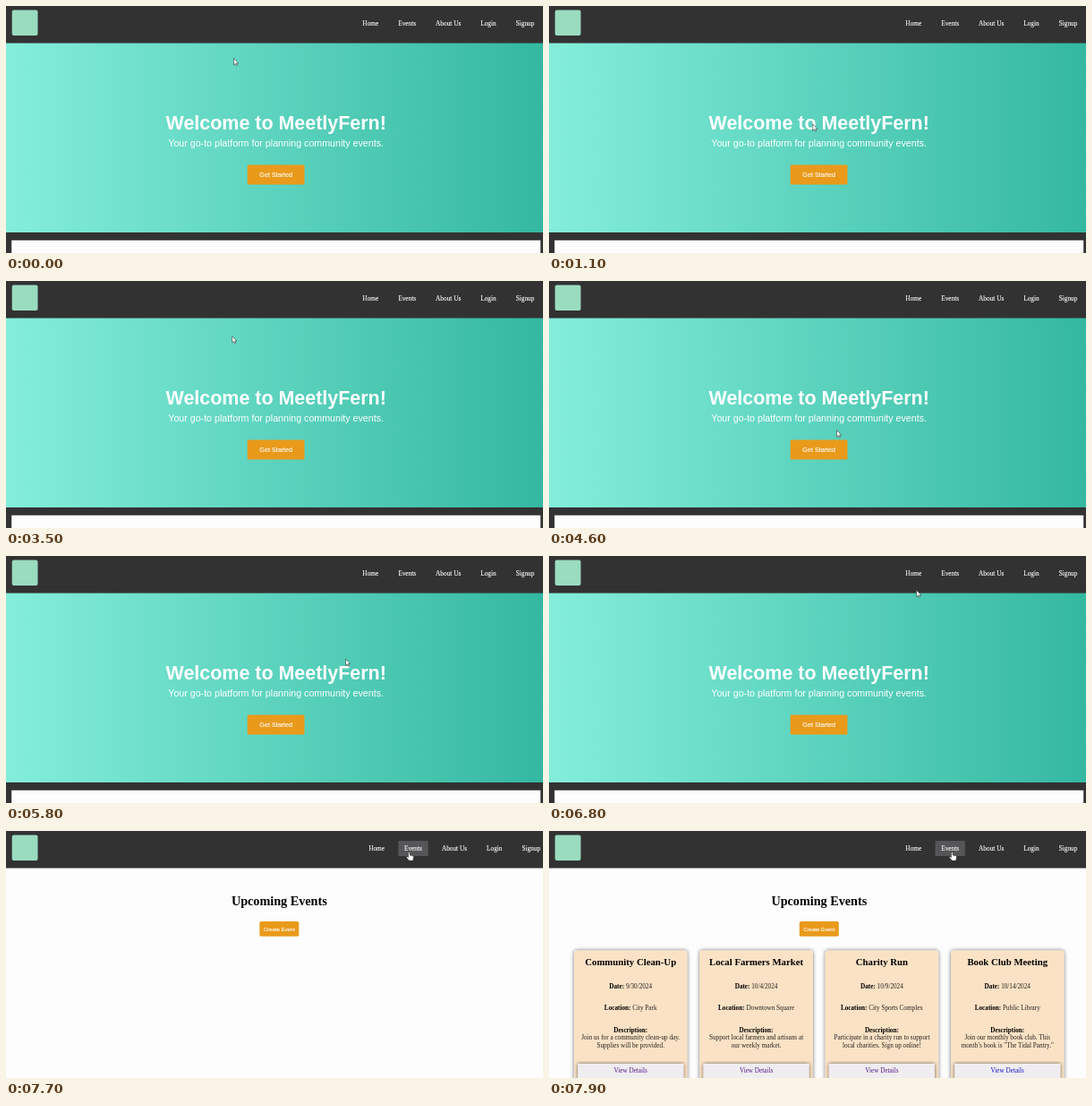
Animation of 600x276 px, one loop 8 s. Source, as an HTML page:

```html
<!DOCTYPE html>
<html lang="en">
<head>
<meta charset="utf-8">
<title>Community events</title>
<style>
  html, body { margin: 0; width: 100%; height: 100%; overflow: hidden; background: #333; }
  svg { display: block; width: 600px; height: 276px; }
  .serif { font-family: "Liberation Serif", "Times New Roman", serif; }
  .sans { font-family: "Liberation Sans", Arial, sans-serif; }
  .mid { text-anchor: middle; }
  .bold { font-weight: bold; }
  .crisp { stroke: #fff; stroke-width: .12px; }
</style>
</head>
<body>
<svg viewBox="0 0 600 276" xmlns="http://www.w3.org/2000/svg">
  <defs>
    <linearGradient id="mint">
      <stop offset="0" stop-color="#84eedb"/>
      <stop offset="1" stop-color="#34b8a1"/>
    </linearGradient>
    <filter id="shadow" x="-10%" y="-10%" width="120%" height="120%">
      <feDropShadow dx="0" dy="0" stdDeviation="2.1" flood-color="#000" flood-opacity=".6"/>
    </filter>
  </defs>

  <g id="home">
    <rect width="600" height="276" fill="#333233"/>
    <rect y="41" width="600" height="212" fill="url(#mint)"/>
    <rect x="6.2" y="261.8" width="591" height="15" fill="#fdfdfd"/>
    <g class="sans mid" fill="#fff">
      <text class="bold" x="301.7" y="138" font-size="21.45">Welcome to MeetlyFern!</text>
      <text x="301.6" y="157" font-size="10.67">Your go-to platform for planning community events.</text>
      <rect x="269.7" y="177.5" width="63.8" height="22" rx="1" fill="#e99a1b"/>
      <text class="crisp" x="301.7" y="190.6" font-size="7.2">Get Started</text>
    </g>
  </g>

  <g id="events">
    <rect width="600" height="276" fill="#fdfdfe"/>
    <g id="eventsHead" class="mid">
      <text class="serif bold" x="301.8" y="83" font-size="14.2">Upcoming Events</text>
      <rect x="279.8" y="101" width="44" height="16.7" rx="1.8" fill="#e99a1b"/>
      <text class="sans crisp" x="301.8" y="111.6" font-size="6" fill="#fff">Create Event</text>
    </g>
    <g id="cards" class="serif mid" font-size="7.2" fill="#222"></g>
  </g>

  <g class="serif" font-size="7.3" fill="#fff">
    <rect width="600" height="41.5" fill="#333233"/>
    <rect x="6.7" y="4.4" width="28.8" height="28.6" rx="2" fill="#9adcc0"/>
    <g id="nav"><rect id="hover" y="11" height="17" fill="#565557"/></g>
  </g>

  <path id="arrow" d="M0 0V7.4L1.7 5.9L2.9 8.4L4 7.9L2.9 5.5H5.2Z" fill="#fff" stroke="#333" stroke-width=".6"/>
  <path id="hand" d="M0 .8Q.8-.5 1.6.8V3.6L5 4.3Q6 4.6 5.9 5.6L5.2 9.6H.9L-2 6.2Q-2.2 4.9-1 5.2L0 6Z" fill="#fff" stroke="#333" stroke-width=".5"/>
</svg>

<script>
const LOOP = 8000, STEP = 100, PAGE_AT = 7700, CARDS_AT = 7800;
const $ = id => document.getElementById(id);

function add(parent, tag, attrs, text = "") {
  const el = document.createElementNS("http://www.w3.org/2000/svg", tag);
  for (const key in attrs) el.setAttribute(key, attrs[key]);
  el.textContent = text;
  parent.append(el);
  return el;
}

// Links are laid out from the right edge with equal gaps.
const GAP = 22, PAD = 6.7, hover = { left: 0, right: 0 };
let edge = 590.4;
for (const label of ["Signup", "Login", "About Us", "Events", "Home"]) {
  const link = add($("nav"), "text", { y: 22, class: "crisp" }, label);
  const x = edge - link.getComputedTextLength();
  link.setAttribute("x", x);
  if (label === "Events") Object.assign(hover, { left: x - PAD, right: edge + PAD });
  edge = x - GAP;
}
$("hover").setAttribute("x", hover.left);
$("hover").setAttribute("width", hover.right - hover.left);

const cards = [
  ["Community Clean-Up", "9/30/2024", "City Park",
    "Join us for a community clean-up day.", "Supplies will be provided."],
  ["Local Farmers Market", "10/4/2024", "Downtown Square",
    "Support local farmers and artisans at", "our weekly market."],
  ["Charity Run", "10/9/2024", "City Sports Complex",
    "Participate in a charity run to support", "local charities. Sign up online!"],
  ["Book Club Meeting", "10/14/2024", "Public Library",
    "Join our monthly book club. This", "month’s book is \"The Tidal Pantry.\""]
];

cards.forEach(([title, date, place, ...description], i) => {
  const card = add($("cards"), "g", { transform: `translate(${91.2 + i * 140.35} 0)` });
  add(card, "rect", { x: -63.2, y: 133.5, width: 126.4, height: 160, rx: 3, fill: "#fbe2c5", filter: "url(#shadow)" });
  add(card, "text", { y: 150.3, class: "bold", "font-size": 10.75, fill: "#000" }, title);

  Object.entries({ Date: date, Location: place, Description: "" }).forEach(([label, value], row) => {
    const line = add(card, "text", { y: 175.7 + row * 24.5 });
    add(line, "tspan", { class: "bold", fill: "#000" }, label + ":");
    if (value) add(line, "tspan", {}, " " + value);
  });
  description.forEach((text, row) => add(card, "text", { y: 232.9 + row * 8.6 }, text));

  add(card, "rect", { x: -59, y: 260, width: 118, height: 24, fill: "#efedef", filter: "url(#shadow)" });
  add(card, "text", { y: 270, fill: i < 3 ? "#551a8b" : "#1a12c8" }, "View Details");
});

// The pointer rests at a few places and swings in a loop from one to the next.
const stops = [
  { t: 0, x: 254.5, y: 58.5 },
  { t: 2300, x: 321.5, y: 45.5 },
  { t: 3500, x: 252.7, y: 61.5 },
  { t: 5800, x: 379.5, y: 115 },
  { t: 6900, x: 449.5, y: 23.5 },
  { t: LOOP, x: 449.5, y: 23.5 }
];
const SWING_X = 60, SWING_Y = 40;

function pointerAt(t) {
  const next = stops.findIndex(stop => stop.t > t);
  const a = stops[next - 1], b = stops[next];
  const k = (t - a.t) / (b.t - a.t);
  const turn = 2 * Math.PI * k, swing = a.x === b.x ? 0 : 1;
  return [
    a.x + (b.x - a.x) * k + swing * SWING_X * Math.sin(turn),
    a.y + (b.y - a.y) * k + swing * SWING_Y * (1 - Math.cos(turn))
  ];
}

const show = (id, on) => $(id).setAttribute("visibility", on ? "visible" : "hidden");
const move = (id, x, y) => $(id).setAttribute("transform", `translate(${x} ${y})`);

function draw(now) {
  const t = Math.floor(now % LOOP / STEP) * STEP;
  const [x, y] = pointerAt(t);
  const loading = t >= PAGE_AT && t < CARDS_AT;
  const over = x > hover.left && x < hover.right && y > 11 && y < 28;

  show("home", t < PAGE_AT);
  show("events", t >= PAGE_AT);
  show("cards", t >= CARDS_AT);
  move("nav", loading ? 6.8 : 0, 0);
  move("eventsHead", loading ? 3.5 : 0, 0);
  show("hover", over);
  show("hand", over);
  show("arrow", !over);
  move("hand", x, y);
  move("arrow", x, y);
}

const start = performance.now();
function tick() {
  draw(performance.now() - start);
  requestAnimationFrame(tick);
}
tick();
</script>
</body>
</html>
```
